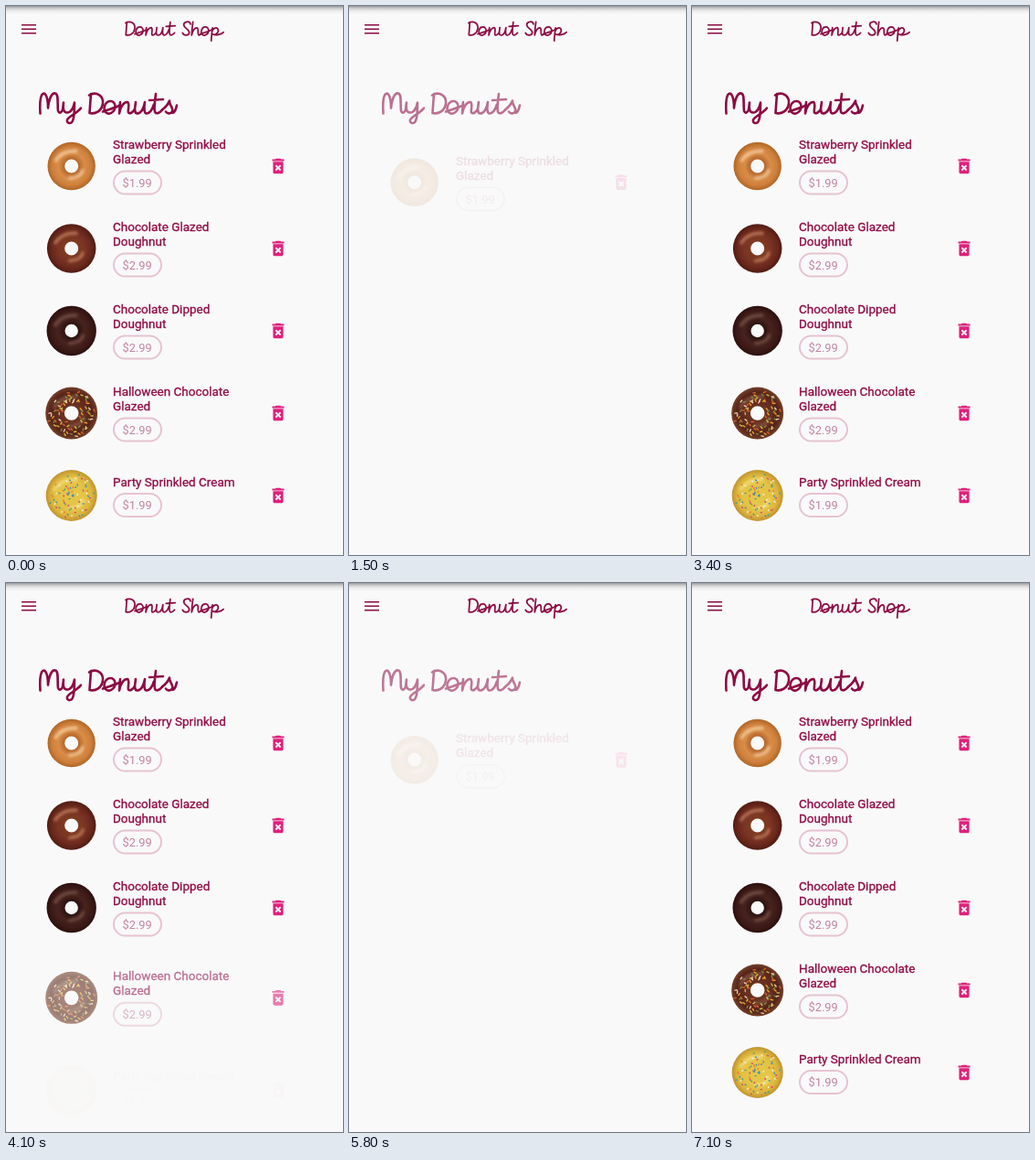
An HTML page that plays this animation: 369x600 px, repeating every 7.2 s.

```html
<!DOCTYPE html>
<html lang="en">
<head>
<meta charset="utf-8">
<title>Donut Shop</title>
<style>
  html, body { margin: 0; width: 100%; height: 100%; overflow: hidden; background: #f9f9f9; }
  svg { display: block; width: 369px; height: 600px; }
  text { font-family: Roboto, sans-serif; font-size: 13.5px; fill: #8f0a45; stroke: #8f0a45; stroke-width: .3; }
  .price { font-size: 12.9px; fill: #c284a2; stroke: none; }
  .pill { fill: none; stroke: #e6c3d2; stroke-width: 2; }
  .script { fill: none; stroke: #8c0a43; stroke-linecap: round; stroke-linejoin: round; }
</style>
</head>
<body>
<svg id="stage" viewBox="0 0 369 600">
  <defs>
    <linearGradient id="shadow" x2="0" y2="1">
      <stop stop-color="#989898"/>
      <stop offset=".3" stop-color="#cecece"/>
      <stop offset=".6" stop-color="#ececec"/>
      <stop offset="1" stop-color="#f9f9f9"/>
    </linearGradient>
    <path id="o" d="M16-2C21-4 29-6 35-9M24-13.5C18-13 16-5 19-1.5C22 2 29-1 29.5-7C30-11 27-14 24-13.5"/>
    <g id="donut">
      <path d="M3-21.5C2.5-15 2-8 1.5-1M1-20C9-25 17-19 16-11C15-3 8 1 1.5-.5"/>
      <use href="#o"/>
      <path d="M35-12.5L34 0C35-7 39-13 43-12.5C46-11 43-4 44-1C45 1 49-1 51-5
        L52-12.5C51-6 50 0 54 0C58 0 61-6 62-12.5C61-6 61 0 64 0C67 0 70-4 72-10
        M74-21.5C73-14 72-5 73-2C74 1 78 0 81-4M67-14.5L82-15.5"/>
    </g>
    <path id="trash" fill="#e0207c" d="M6 19c0 1.1.9 2 2 2h8c1.1 0 2-.9 2-2V7H6v12zm2.46-7.12l1.41-1.41L12 12.59l2.12-2.12 1.41 1.41L13.41 14l2.12 2.12-1.41 1.41L12 15.41l-2.12 2.12-1.41-1.41L10.59 14l-2.13-2.12zM15.5 4l-1-1h-5l-1 1H5v2h14V4z"/>
    <filter id="soft" x="-50%" y="-50%" width="200%" height="200%"><feGaussianBlur stdDeviation="1.6"/></filter>
  </defs>
  <rect width="369" height="9" fill="url(#shadow)"/>
  <path d="M17 20.8h16M17 25.3h16M17 29.8h16" stroke="#8c0a43" stroke-width="1.6"/>
  <g class="script" transform="translate(130.3 32) scale(.67)" stroke-width="2.6">
    <use href="#donut"/>
    <g transform="translate(93)">
      <path d="M14-18C13-24 3-23 3-17C3-11 13-10 12-4C11 1 3 1 1-4
        M18-22C17-14 16-6 16 0C17-7 21-13 25-12C28-11 25-3 27-1C28 1 31-2 33-4
        M50-12C49-4 48 4 48 9M49-6C51-12 57-14 59-10C61-4 54 1 50-2C55 1 64-1 68-5"/>
      <use href="#o" x="14"/>
    </g>
  </g>
  <g id="heading" class="script" transform="translate(36 117.5)" stroke-width="2.6">
    <path d="M1.5 0C1-8 1-16 3-20C6-25 10-20 10-6C11-16 14-23 18-22C22-21 20-10 21-3C22 0 24 0 26-4
      L27-12C26-5 27-1 31-1C35-1 38-6 39-12C39-4 39 4 37 8C35 12 30 11 31 7C32 3 42 0 46-6"/>
    <g transform="translate(54)">
      <use href="#donut"/>
      <path d="M81-4C86-8 88-11 89-14C88-10 94-6 92-2C90 1 86 0 85-2M92-1C94 0 96-4 97-9"/>
    </g>
  </g>
</svg>
<script>
const stage = document.getElementById('stage');

// Tones run from the hole outwards; hole 0 means a filled donut.
const donuts = [
  { lines: ['Strawberry Sprinkled', 'Glazed'], price: '$1.99', r: 26.2, hole: 7.5,
    tones: ['#b5652a', '#d88d48', '#cf803d', '#b06626'], shine: '#fbdcb2' },
  { lines: ['Chocolate Glazed', 'Doughnut'], price: '$2.99', r: 26.8, hole: 7.5,
    tones: ['#7e3a20', '#7a3424', '#6a281c', '#511c14'], shine: '#cf8a68' },
  { lines: ['Chocolate Dipped', 'Doughnut'], price: '$2.99', r: 27.2, hole: 7.2,
    tones: ['#2c1210', '#47231e', '#3d1a17', '#2c110f'], shine: '#80584f' },
  { lines: ['Halloween Chocolate', 'Glazed'], price: '$2.99', r: 28.5, hole: 7.8,
    tones: ['#6b3420', '#632c20', '#562419', '#74402a'], shine: '#8d5c4b',
    sprinkles: ['#e8a02c', '#c9bd4a', '#e9cfb0', '#7d8a3c', '#d8602c'], size: 2.4 },
  { lines: ['Party Sprinkled Cream'], price: '$1.99', r: 28, hole: 0,
    tones: ['#e6c848', '#e4c344', '#dcb53c', '#bf932f'], shine: '#f4e48c',
    sprinkles: ['#3f8fb8', '#d8487c', '#e87f38', '#f4efd8', '#4c9c84'], size: 1 },
];

function random(seed) {
  return () => (seed = seed * 16807 % 2147483647) / 2147483647;
}

function sprinkles({ sprinkles: colors, size, r, hole }) {
  const rnd = random(77);
  const inner = hole && hole + 3;
  let out = '';
  for (let i = 0; i < 75; i++) {
    const dist = Math.sqrt(inner ** 2 + rnd() * ((r - 3) ** 2 - inner ** 2));
    const a = i * 2.4, dir = rnd() * 6.3;
    const x = dist * Math.cos(a), y = dist * Math.sin(a);
    out += `<path d="M${x} ${y}l${size * Math.cos(dir)} ${size * Math.sin(dir)}" stroke="${colors[i % 5]}"/>`;
  }
  return `<g stroke-width="1.4" stroke-linecap="round">${out}</g>`;
}

function donutArt(d, i) {
  const { r, hole, tones, shine } = d;
  const stops = [hole / r, .55, .8, 1]
    .map((at, k) => `<stop offset="${at}" stop-color="${tones[k]}"/>`).join('');
  const ring = s => `M${-s} 0a${s} ${s} 0 1 0 ${2 * s} 0a${s} ${s} 0 1 0 ${-2 * s} 0z`;
  const m = r * .66, n = r * .42;
  return `<radialGradient id="glaze${i}" gradientUnits="userSpaceOnUse" cx="0" cy="0" r="${r}">${stops}</radialGradient>
    <path d="${ring(r)}${hole ? ring(hole) : ''}" fill="url(#glaze${i})" fill-rule="evenodd"/>
    <g fill="none" stroke="${shine}" stroke-linecap="round" filter="url(#soft)" opacity=".75">
      <path d="M${-m} ${-m * .35}Q${-m * .6} ${-m} ${m * .3} ${-m * .95}" stroke-width="3.5"/>
      <path d="M${n * 1.1} ${n * .4}Q${n} ${n * 1.1} ${-n * .2} ${n * 1.2}" stroke-width="3"/>
    </g>
    ${d.sprinkles ? sprinkles(d) : ''}`;
}

function row(d, i) {
  const y = 175 + 90 * i;
  const top = d.lines.length > 1 ? -19 : -10.5;
  const pill = top + 16 * d.lines.length - 7.5;
  const g = document.createElementNS('http://www.w3.org/2000/svg', 'g');
  g.innerHTML = `<g transform="translate(71.7 ${y})">${donutArt(d, i)}</g>
    ${d.lines.map((s, k) => `<text x="117" y="${y + top + 16 * k}">${s}</text>`).join('')}
    <rect class="pill" x="118" y="${y + pill}" width="52" height="25" rx="12.5"/>
    <text class="price" x="143.6" y="${y + pill + 17.4}" text-anchor="middle">${d.price}</text>
    <use href="#trash" transform="translate(298 ${y}) scale(.93) translate(-12 -12)"/>`;
  return stage.appendChild(g);
}

const heading = document.getElementById('heading');
const rows = donuts.map(row);

const LOOP = 7200, STEP = 100, FADE = 220, STAGGER = 125, SLIDE = 20;
const restarts = [1350, 3472, 5656];

function draw(now) {
  const t = Math.floor((now % LOOP + 5) / STEP) * STEP % LOOP;
  const start = restarts.filter(s => s <= t).pop() ?? -LOOP;
  const progress = delay => Math.min(1, Math.max(0, (t - start - delay) / FADE));
  heading.setAttribute('opacity', progress(25));
  rows.forEach((g, i) => {
    const p = progress(STAGGER * (i + 1));
    g.setAttribute('opacity', p);
    g.setAttribute('transform', `translate(0 ${SLIDE * (1 - p)})`);
  });
}

const begin = performance.now();
function tick() {
  draw(performance.now() - begin);
  requestAnimationFrame(tick);
}
tick();
</script>
</body>
</html>
```
